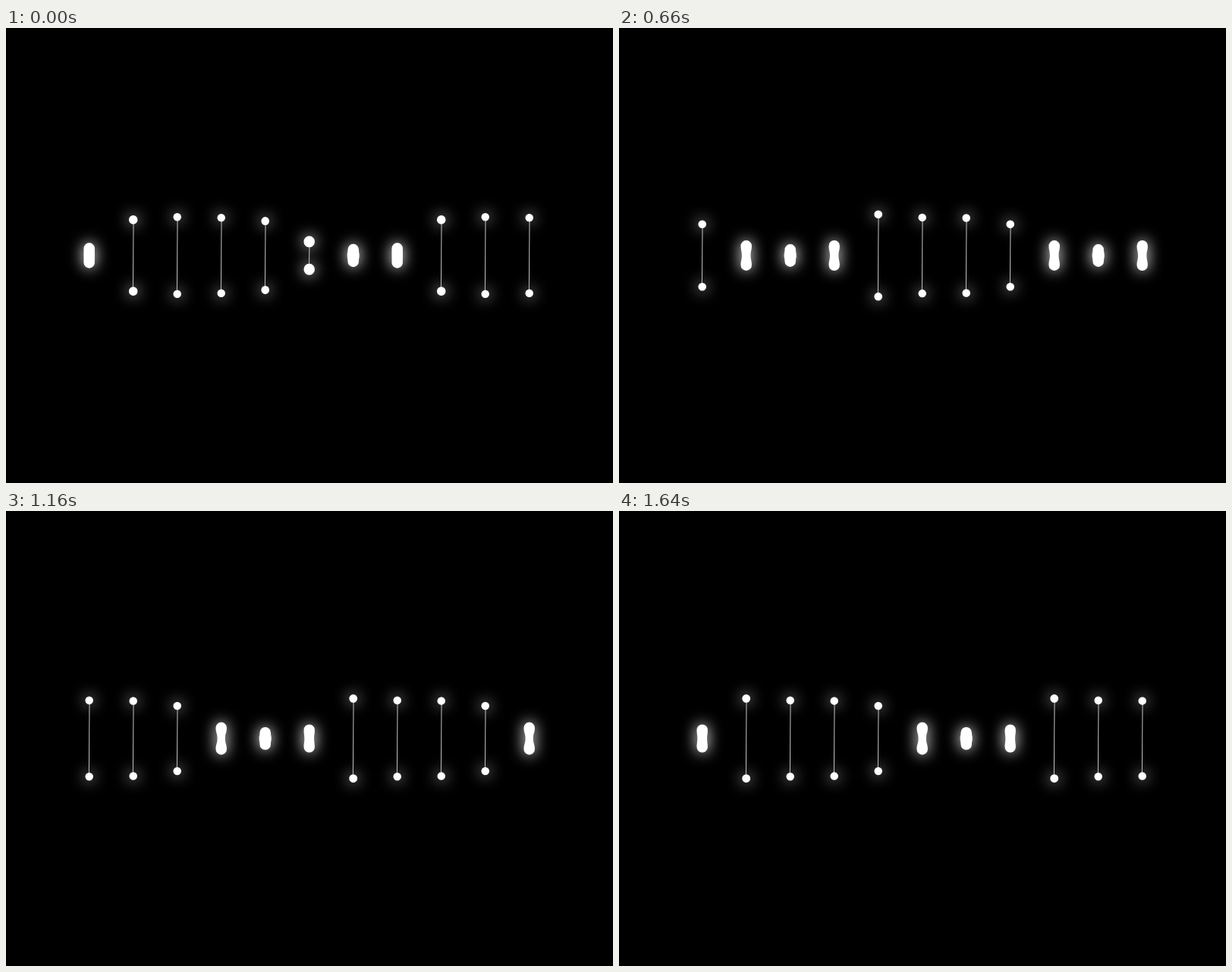
An HTML page for the animation above (1660 ms loop, 800 by 600 pixels).

```html
<!DOCTYPE html>
<html lang="en">
<head>
<meta charset="utf-8">
<title>Pulse loader</title>
<style>
  html, body { margin: 0; width: 100%; height: 100%; overflow: hidden; background: #000; }
  svg { display: block; width: 100%; height: 100%; }
</style>
</head>
<body>
<svg viewBox="0 0 800 600">
  <defs>
    <filter id="glow" filterUnits="userSpaceOnUse" x="50" y="190" width="700" height="220" color-interpolation-filters="sRGB">
      <feGaussianBlur stdDeviation="9.5"/>
    </filter>
  </defs>
  <path id="halo" fill="#fff" filter="url(#glow)"/>
  <path id="lines" stroke="#c4c4c4" fill="none"/>
  <path id="dots" fill="#fff"/>
</svg>
<script>
const LOOP = 1660, STEP = 20, CYCLE = 1680, DELAY = 240;
const COLS = 11, X0 = 109.7, GAP = 58, MID = 300;
const REST = 160;      // phase at which a pair is fully merged
const NEAR = 7.6, FAR = 50, SPLIT = 15.2;
const SLANT = 0.35;

const [halo, lines, dots] = ['halo', 'lines', 'dots'].map(id => document.getElementById(id));
const f = v => v.toFixed(2);

// Smooth step from 0 to 1 around a moment
const rise = (p, mid, width) => 1 / (1 + Math.exp((mid - p) / width));
const bump = (p, mid, width) => Math.exp(-(((p - mid) / width) ** 2) / 2);

// Half distance between the dots: open, swell a little, snap shut
function spread(p) {
  const open = rise(p, 522, 80) ** 1.4 - rise(p, 1506, 56);
  return NEAR + (FAR - NEAR) * open + 8.3 * bump(p, 1390, 90);
}

// Dots shrink while they are apart
function radius(p) {
  return 7.25 - 2 * (rise(p, 575, 25) - rise(p, 1490, 40));
}

function circle(x, y, r) {
  return `M${f(x - r)} ${f(y)}a${f(r)} ${f(r)} 0 1 1 ${f(2 * r)} 0a${f(r)} ${f(r)} 0 1 1 ${f(-2 * r)} 0Z`;
}

// Two joined dots; the waist bulges when close and narrows when stretched
function blob(x, h, r) {
  const w = r + 0.45 * (9.5 - h);
  const cap = (s, y) => `A${f(r)} ${f(r)} 0 0 1 ${f(x + s * r)} ${f(y)}`;
  const side = (s, v) => {
    const a = f(x + s * r), b = f(x + s * w), y = k => f(MID + v * k * h);
    return `C${a} ${y(0.5)} ${b} ${y(0.5)} ${b} ${MID}C${b} ${y(-0.5)} ${a} ${y(-0.5)} ${a} ${y(-1)}`;
  };
  return `M${f(x - r)} ${f(MID - h)}` + cap(1, MID - h) + side(1, -1) + cap(-1, MID + h) + side(-1, 1) + 'Z';
}

function draw(t) {
  let shape = '', link = '';
  for (let i = 0; i < COLS; i++) {
    const x = X0 + GAP * i;
    const p = REST + (t - DELAY * i - REST + 2 * CYCLE) % CYCLE;
    const h = spread(p), r = radius(p);
    if (h < SPLIT) {
      shape += blob(x, h, r);
    } else {
      shape += circle(x, MID - h, r) + circle(x, MID + h, r);
      link += `M${f(x + SLANT)} ${f(MID - h)}L${f(x - SLANT)} ${f(MID + h)}`;
    }
  }
  halo.setAttribute('d', shape);
  dots.setAttribute('d', shape);
  lines.setAttribute('d', link);
}

const start = performance.now();
function tick() {
  const t = (performance.now() - start) % LOOP;
  draw(Math.floor(t / STEP) * STEP);
  requestAnimationFrame(tick);
}
tick();
</script>
</body>
</html>
```
